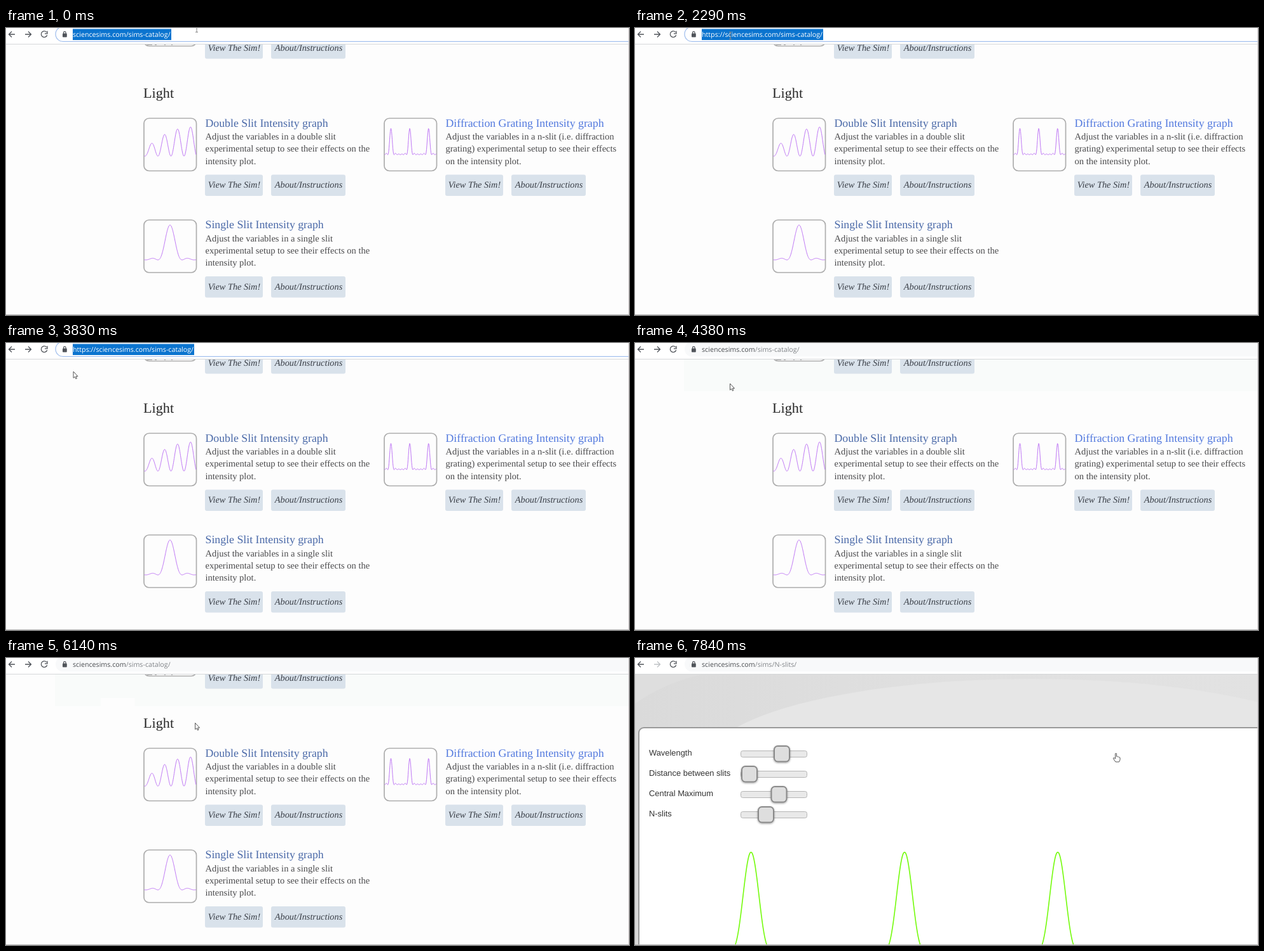
Animation, 980 px wide and 453 px high, one loop 8 s. Source, as an HTML page:

```html
<!DOCTYPE html>
<html lang="en">
<head>
<meta charset="utf-8">
<title>Slit simulations</title>
<style>
  html, body { margin: 0; width: 100%; height: 100%; overflow: hidden; background: #fdfdfd; }
  svg { display: block; width: 980px; height: 453px; }
  text { text-rendering: geometricPrecision; white-space: pre; }
  .page text { font: 14.5px "Liberation Serif", serif; fill: #4a4a4c; }
  .page .head { font-size: 22.2px; fill: #262626; }
  .page .title { font-size: 17.8px; fill: #4a69a8; }
  .page .link { fill: #5279de; }
  .page .hover { fill: #3c3c3c; }
  .page .btn { font-size: 14.3px; font-style: italic; text-anchor: middle; fill: #3a3f47; }
  .thumb { fill: #fdfdfd; stroke: #adadad; stroke-width: 1.7; }
  .plot { fill: none; stroke: #bf78f5; stroke-width: 1; }
  .url text { font: 10.7px "Open Sans", "Noto Sans", sans-serif; fill: #808488; }
  .url .host { fill: #4a4d51; }
  .url .full { fill: #5f6368; }
  .url .picked text { fill: #fff; }
  .icon { fill: none; stroke: #50545a; stroke-width: 1.3; }
  .sim text { font: 12.9px "Liberation Sans", Arial, sans-serif; fill: #333; }
  .cursor { fill: #fff; stroke: #555; stroke-width: 1; stroke-linejoin: round; }
</style>
</head>
<body>
<svg viewBox="0 0 980 453">
  <defs>
    <clipPath id="pick"><rect id="pickBox" y="0" height="20"/></clipPath>
    <linearGradient id="sky">
      <stop offset="0" stop-color="#dadada"/>
      <stop offset=".5" stop-color="#e0e0e0"/>
      <stop offset="1" stop-color="#e2e2e2"/>
    </linearGradient>
    <filter id="soft" x="-30%" y="-30%" width="160%" height="160%">
      <feDropShadow dx="0" dy="1" stdDeviation="1.5" flood-opacity=".4"/>
    </filter>
  </defs>
  <rect width="980" height="453" fill="#fdfdfd"/>

  <g id="page" class="page">
    <g id="band">
      <rect x="77" y="26" width="903" height="50" fill="#f9fbfa"/>
      <rect id="wipe" x="149" y="63" height="13" fill="#fdfdfd"/>
    </g>
    <rect class="thumb" x="217" y="-55" width="82.5" height="83.5" rx="8"/>
    <path d="M222 26.5h8m4 0h3m12 0h2m9 0h2" stroke="#aaa"/>
    <text class="head" x="216" y="110.3">Light</text>
  </g>

  <g id="sim" class="sim">
    <rect y="25" width="980" height="428" fill="url(#sky)"/>
    <path d="M0 72Q45 40 105 26H0z" fill="#dedede"/>
    <ellipse cx="625" cy="163" rx="510" ry="130" fill="#e6e6e6"/>
    <rect x="6" y="110" width="1000" height="380" rx="8" fill="#fff" stroke="#9a9a9a" stroke-width="2"/>
  </g>

  <rect width="980" height="25" fill="#fff"/>
  <path d="M0 25.5H980" stroke="#d5d7d9"/>
  <rect id="pill" x="78" y="-2" width="1000" height="23.3" rx="11.6"/>
  <g class="icon">
    <path d="M14 10H4.500M9 5.500L4.500 10L9 14.500"/>
    <path id="forward" d="M30 10H39.500M35 5.500L39.500 10L35 14.500"/>
    <path id="reload" d="M63.800 6.600A4.800 4.800 0 1 0 64.700 11.300M65 4.800V8.800H61"/>
    <path id="stop" d="M56 6L64.500 14.500M64.500 6L56 14.500"/>
    <path d="M90.500 9V7.500a1.800 1.800 0 0 1 3.600 0V9" stroke-width="1.200"/>
  </g>
  <rect x="89" y="8.500" width="6.800" height="6" rx="1" fill="#50545a"/>
  <g class="url">
    <text id="plain" x="105" y="14"><tspan class="host">sciencesims.com</tspan><tspan id="path"></tspan></text>
    <text id="typed" class="full" x="105" y="14"></text>
    <g id="picked" class="picked" clip-path="url(#pick)">
      <rect x="105" y="1.500" width="200" height="17.500" fill="#0b74cf"/>
      <text id="pickedText" x="105" y="14"></text>
    </g>
  </g>
  <path d="M0 452.500H980" stroke="#b9b9b9"/>
  <path d="M979.500 0V453" stroke="#d8d2d4"/>

  <g id="cursor" class="cursor">
    <path id="beam" d="M-2-5.500h4M0-5.500v11M-2 5.500h4" fill="none" stroke="#888"/>
    <path id="arrow" d="M0 0V10.200L2.300 8.200L3.800 11.500L5.400 10.800L4 7.600H7z"/>
    <path id="hand" d="M-1 9V1Q0-1 1 1V5.500Q2.300 4.700 3 6Q4.300 5.300 5 6.700Q6.400 6.300 6.500 8V10.500Q6 12 5 14H-.500Q-3 11-4.300 8Q-3 6.500-1 9"/>
  </g>
</svg>
<script>
const LOOP = 8000;
const $ = id => document.getElementById(id);

function add(parent, tag, attrs, text = '') {
  const el = document.createElementNS('http://www.w3.org/2000/svg', tag);
  for (const k in attrs) el.setAttribute(k, attrs[k]);
  el.textContent = text;
  return parent.appendChild(el);
}

function curve(parent, x0, x1, y, attrs) {
  let d = '';
  for (let x = x0; x <= x1; x += 0.5) d += (d ? 'L' : 'M') + x + ' ' + y(x).toFixed(2);
  return add(parent, 'path', { d, ...attrs });
}

// Intensity behind n slits; u counts the principal maxima.
function slits(u, n) {
  const a = Math.PI * (u + 1e-6);
  return (Math.sin(n * a) / (n * Math.sin(a))) ** 2;
}

function button(x, y, w, label) {
  add(page, 'rect', { x, y, width: w, height: 33.5, rx: 3, fill: '#d9e2eb' });
  add(page, 'text', { class: 'btn', x: x + w / 2 + 0.5, y: y + 20.8 }, label);
}

function buttons(x, y) {
  button(x, y, 91, 'View The Sim!');
  button(x + 104, y, 117, 'About/Instructions');
}

function card(x, y, title, lines, plot) {
  add(page, 'rect', { class: 'thumb', x: x + 1, y: y + 1, width: 82.5, height: 83, rx: 8 });
  curve(page, x + 1.5, x + 83, v => y + plot(v - x), { class: 'plot' });
  const name = add(page, 'text', { class: 'title', x: x + 97.5, y: y + 14.4 }, title);
  lines.forEach((s, i) => add(page, 'text', { x: x + 97.5, y: y + 34.7 + 19.2 * i }, s));
  buttons(x + 97, y + 90);
  return name;
}

const page = $('page'), sim = $('sim');
const setup = 'experimental setup to see their effects';

buttons(313, 15);
card(216, 141.5, 'Double Slit Intensity graph',
  ['Adjust the variables in a double slit', setup + ' on the', 'intensity plot.'],
  x => 60.7 - 46 * (1 - 0.56 * ((76 - x) / 63) ** 2) * Math.sin(Math.PI * (x - 2.5) / 20.5) ** 2);
card(216, 302, 'Single Slit Intensity graph',
  ['Adjust the variables in a single slit', setup + ' on the', 'intensity plot.'],
  x => 64 - 55 * slits((x - 42) / 760, 40));
const link = card(594, 141.5, 'Diffraction Grating Intensity graph',
  ['Adjust the variables in a n-slit (i.e. diffraction', 'grating) ' + setup, 'on the intensity plot.'],
  x => 58.5 - 41.5 * slits((x - 11.5) / 29.6, 6));
const underline = add(page, 'path', { d: 'M691.5 157.500H941.500', stroke: '#444' });

[['Wavelength', 231], ['Distance between slits', 180], ['Central Maximum', 226.5], ['N-slits', 206]]
  .forEach(([label, x], i) => {
    const y = 151 + 32 * i;
    add(sim, 'text', { x: 22, y: y + 3.3 }, label);
    add(sim, 'rect', { x: 166.5, y: y - 4.5, width: 104, height: 10, rx: 3, fill: '#e9e9e9', stroke: '#b5b5b5' });
    add(sim, 'rect', { x: x - 12, y: y - 12, width: 24, height: 24.5, rx: 5.5,
      fill: '#dedede', stroke: '#8a8a8a', 'stroke-width': 2, filter: 'url(#soft)' });
  });
[182.5, 424, 665].forEach(c => curve(sim, c - 25, c + 25, x => 459.5 - 153 * slits((x - c) / 241.5, 8),
  { fill: 'none', stroke: '#74fb0c', 'stroke-width': 1.6 }));

// The screen refreshes in bursts: start, end, number of refreshes.
const bursts = [[130, 640, 5], [1040, 1890, 7], [2170, 3090, 7], [3240, 4250, 8],
  [4380, 5330, 7], [5450, 6400, 7], [6550, 7100, 5], [7690, 7840, 2]];

// Pointer path: time, x, y.
const way = [[0, 300, 1], [130, 304, 2], [640, 313, 9], [1040, 285, 6], [1323, 224, -14],
  [1890, 104, 4], [2170, 150, 12], [2477, 336, 16], [2783, 290, 10], [3090, 225, 8],
  [3240, 165.5, 8], [3384, 112, 9], [3529, 93, 9], [3817, 106, 45], [4106, 134, 102],
  [4250, 143, 98], [4380, 149.5, 64], [4850, 175, 66], [5330, 216, 87], [6083, 297.5, 102.5],
  [6242, 338, 122], [6400, 393, 124], [6688, 560, 142], [6825, 675, 150], [7100, 756.5, 150]];

function refresh(t) {
  let last = 0;
  for (const [a, b, n] of bursts) {
    if (t < a) break;
    const step = (b - a) / (n - 1);
    last = a + Math.floor((Math.min(t, b) - a) / step + 0.05) * step;
  }
  return last;
}

function pointer(t) {
  const i = way.findIndex(p => p[0] > t);
  if (i < 0) return way[way.length - 1].slice(1);
  const [t0, x0, y0] = way[i - 1], [t1, x1, y1] = way[i];
  const k = (t - t0) / (t1 - t0);
  return [x0 + (x1 - x0) * k, y0 + (y1 - y0) * k];
}

const clamp = (v, lo, hi) => Math.min(hi, Math.max(lo, v));
const show = (el, on) => el.style.display = on ? '' : 'none';

// Left edge of the selection while the pointer drags it.
function pickStart(t, x) {
  if (t < 250) return 105;
  if (t < 1040) return 296;
  if (t > 2000 && t < 2470) return 105;
  if (t >= 2470 && t < 2780) return 296;
  return t < 3500 ? clamp(x + 1, 105, 296) : 105;
}

function draw(now) {
  const t = refresh(now);
  const [x, y] = pointer(t);
  const focus = t < 4370, full = t > 250, done = t > 7830, hover = t > 6900;

  show(page, !done);
  show(sim, done);
  show($('band'), !focus);
  $('wipe').setAttribute('width', clamp(x - 149.5, 0, 53.5));

  const pill = $('pill');
  pill.setAttribute('fill', focus ? '#fff' : '#f8f9fa');
  pill.setAttribute('stroke', focus ? '#a3c0ee' : 'none');
  pill.setAttribute('stroke-width', 1.3);

  const url = (full ? 'https://' : '') + 'sciencesims.com/sims-catalog/';
  const from = pickStart(t, x);
  show($('plain'), !focus);
  show($('typed'), focus);
  show($('picked'), focus);
  $('path').textContent = done ? '/sims/N-slits/' : '/sims-catalog/';
  $('typed').textContent = $('pickedText').textContent = url;
  $('pickBox').setAttribute('x', from);
  $('pickBox').setAttribute('width', Math.max(0, (full ? 296 : 260) - from));

  $('forward').style.stroke = done ? '#bfc2c5' : '';
  const loading = t > 7680 && !done;
  show($('stop'), loading);
  show($('reload'), !loading);

  link.setAttribute('class', 'title ' + (hover ? 'hover' : 'link'));
  show(underline, hover);

  $('cursor').setAttribute('transform', `translate(${x} ${y})`);
  show($('beam'), t < 3600);
  show($('arrow'), t >= 3600 && !hover);
  show($('hand'), hover);
}

function loop() {
  draw(performance.now() % LOOP);
  requestAnimationFrame(loop);
}
loop();
</script>
</body>
</html>
```
